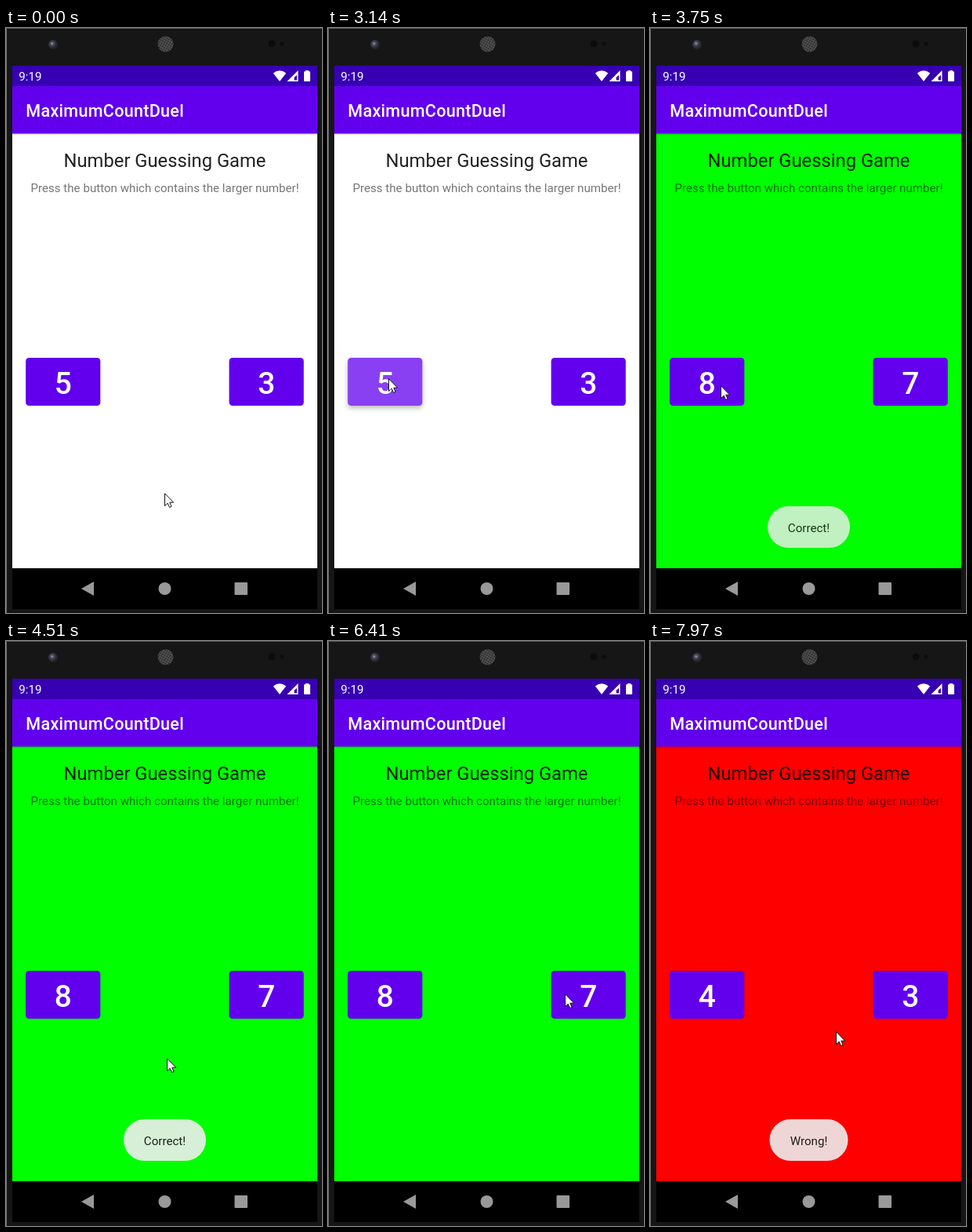
An HTML page for the animation above (8 s loop, 403 by 745 pixels).

```html
<!DOCTYPE html>
<html lang="en">
<head>
<meta charset="utf-8">
<title>Number game</title>
<style>
  html, body { margin: 0; width: 100%; height: 100%; overflow: hidden; background: #161616; }
  svg { display: block; font-family: Roboto, Arial, sans-serif; }
  .mid { text-anchor: middle; }
  .white { fill: #fff; }
  .bold { font-weight: 500; }
  .small { font-size: 15.13px; }
  .digit { font-size: 38.9px; }
</style>
</head>
<body>
<svg width="403" height="745" viewBox="0 0 403 745">
  <defs>
    <pattern id="mesh" width="3" height="3" patternUnits="userSpaceOnUse" patternTransform="rotate(30)">
      <rect width="3" height="3" fill="#555"/>
      <circle cx="1.5" cy="1.5" r="1" fill="#1c1c1c"/>
    </pattern>
    <radialGradient id="lens" cx=".4" cy=".4">
      <stop offset="0" stop-color="#9a9cb8"/>
      <stop offset=".4" stop-color="#45465a"/>
      <stop offset="1" stop-color="#24242a"/>
    </radialGradient>
    <linearGradient id="fade" x2="0" y2="1">
      <stop offset="0" stop-opacity=".2"/>
      <stop offset="1" stop-opacity="0"/>
    </linearGradient>
  </defs>

  <!-- phone body -->
  <rect width="403" height="745" fill="#161616"/>
  <rect width="1" height="745" fill="#777"/>
  <rect width="403" height="1" fill="#555"/>
  <circle cx="60" cy="21" r="6" fill="url(#lens)"/>
  <circle cx="203.5" cy="20.5" r="10" fill="url(#mesh)"/>
  <circle cx="339" cy="20" r="4.5" fill="#0c0c0c"/>
  <circle cx="352" cy="20" r="2.5" fill="#0c0c0c"/>

  <!-- screen -->
  <rect id="page" x="8" y="134" width="389" height="554"/>
  <rect x="8" y="134" width="389" height="3" fill="url(#fade)"/>
  <rect x="8" y="48" width="389" height="26" fill="#3700b3"/>
  <rect x="8" y="74" width="389" height="60.5" fill="#6200ee"/>
  <text class="white small" x="16.3" y="66.5">9:19</text>
  <g class="white">
    <path d="M349 68 L340.8 57.4 Q349 51 357.2 57.4 Z"/>
    <path d="M372.5 54 V68 H358.5 Z"/>
    <path d="M371 60 V66.6 H367.6 V62.8 Z" fill="#3700b3"/>
    <path d="M382 55.3 V54 H386 V55.3 H387.2 Q388 55.3 388 56.2 V67.2 Q388 68 387.2 68 H380.8 Q380 68 380 67.2 V56.2 Q380 55.3 380.8 55.3 Z"/>
  </g>
  <text class="white bold" x="25.3" y="112.5" font-size="21.6" letter-spacing=".27">MaximumCountDuel</text>
  <text class="mid" x="202.5" y="177" font-size="23.77" fill-opacity=".87">Number Guessing Game</text>
  <text class="mid small" x="202.5" y="208.5" fill-opacity=".54">Press the button which contains the larger number!</text>

  <g id="buttons"></g>

  <g id="toast">
    <rect y="609" height="53" rx="26.5" fill="#eee" fill-opacity=".9"/>
    <text class="mid small" x="202.5" y="641.5" fill-opacity=".87"></text>
  </g>

  <!-- navigation bar -->
  <rect x="8" y="688" width="389" height="52" fill="#000"/>
  <g fill="#999">
    <path d="M96 714 L112 705 V723 Z"/>
    <circle cx="202.5" cy="714" r="8"/>
    <rect x="291.5" y="706" width="16.5" height="16" rx="1"/>
  </g>

  <path id="cursor" d="M.5 .8 V16.6 L4.2 13.2 L6.6 18.5 L9.1 17.4 L6.8 12.2 H11.7 Z"
        fill="#fff" stroke="#111" stroke-linejoin="round"/>
</svg>

<script>
const LOOP = 8000;

// Each row holds from its first value, a time in ms, until the next row.
const rounds = [
  [0, '#fff', 5, 3],
  [3270, '#0f0', 8, 7, 'Correct!', 105],
  [7160, '#f00', 4, 3, 'Wrong!', 100]
];
const moves = [
  [0, 202, 592], [1480, 193, 582], [1600, 171, 559], [1720, 147, 534],
  [1860, 117, 493], [2010, 98, 470], [2130, 86, 456], [2250, 79, 448], [2370, 77, 446],
  [3750, 90, 455], [3870, 110, 466], [3990, 128, 473], [4130, 152, 491],
  [4270, 180, 511], [4390, 198, 526], [4510, 205, 531],
  [5150, 206, 523], [5270, 205, 531], [6030, 208, 529],
  [6170, 240, 505], [6290, 277, 472], [6410, 302, 449], [6530, 313, 444], [6650, 318, 442],
  [7700, 308, 450], [7820, 282, 468], [7970, 237, 497]
];
const presses = [
  [0, 0, 0], [3140, 1, 0], [3390, .6, 0], [3510, .2, 0], [3630, 0, 0],
  [7040, 0, 1], [7280, 0, .5], [7400, 0, 0]
];
const toasts = [
  [0, 0], [3510, .3], [3630, .65], [3750, .9], [3870, 1],
  [5150, .9], [5270, .7], [5410, .45], [5530, .2], [5650, 0],
  [7400, .3], [7550, .65], [7700, .9], [7820, 1]
];

const byId = id => document.getElementById(id);
const at = (rows, t) => rows.findLast(row => row[0] <= t).slice(1);

byId('buttons').innerHTML = [25.2, 284.6].map(x => `
  <g>
    <rect x="${x}" y="420" width="95.1" height="61" rx="4.3"/>
    <text class="mid white bold digit" x="${x + 47.6}" y="466"></text>
  </g>`).join('');

const buttons = [...byId('buttons').children];
const [toastBox, toastText] = byId('toast').children;

function drawButton(button, digit, press) {
  const [box, label] = button.children;
  const tint = [98, 0, 238].map(c => Math.round(c + (255 - c) * press / 4));
  box.style.fill = `rgb(${tint})`;
  box.style.filter =
    `drop-shadow(0 ${.5 + press * 2.5}px ${.5 + press * 2.5}px rgba(0,0,0,${.12 + press * .16}))`;
  label.textContent = digit;
}

function draw(t) {
  const [color, left, right, message = '', width = 0] = at(rounds, t);
  const press = at(presses, t);
  const [x, y] = at(moves, t);
  byId('page').style.fill = color;
  [left, right].forEach((digit, i) => drawButton(buttons[i], digit, press[i]));
  byId('toast').style.opacity = at(toasts, t)[0];
  toastBox.setAttribute('x', 202.5 - width / 2);
  toastBox.setAttribute('width', width);
  toastText.textContent = message;
  byId('cursor').setAttribute('transform', `translate(${x} ${y})`);
}

const start = performance.now();
function tick() {
  draw((performance.now() - start) % LOOP);
  requestAnimationFrame(tick);
}
tick();
</script>
</body>
</html>
```
